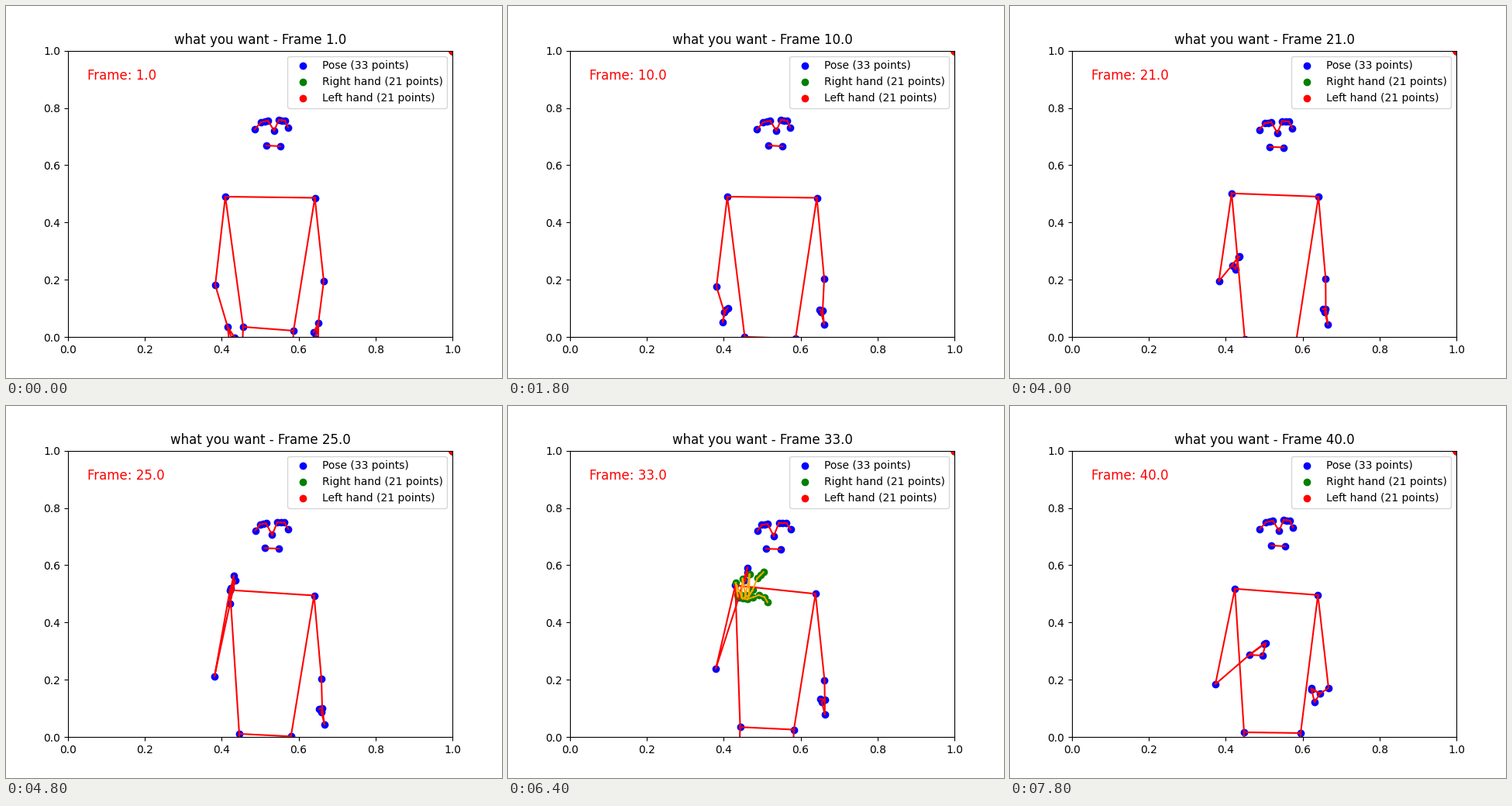
These frames come from a looping animation (640x480 px, 8 s). A matplotlib script:

```python
import numpy as np
import matplotlib.pyplot as plt
from matplotlib.animation import FuncAnimation

FRAMES = 40
HAND_SEEN = range(26, 33)

# Key moments in stage pixels: frame, elbow, wrist, index finger from the wrist
RIGHT_ARM = [
    (0, 270, 360, 286, 414, 8, 22),
    (9, 269, 362, 279, 395, 2, -3),
    (16, 270, 361, 284, 414, 12, 14),
    (24, 269, 349, 289, 255, 5, -36),
    (28, 271, 325, 296, 229, 13, -26),
    (35, 266, 349, 299, 261, 10, -48),
    (39, 265, 359, 309, 321, 21, -15),
]
LEFT_ARM = [
    (0, 410, 355, 403, 409, -4, 20),
    (9, 408, 352, 406, 393, -2, 2),
    (24, 407, 352, 408, 390, -1, 5),
    (35, 409, 355, 409, 375, -5, 2),
    (39, 411, 364, 400, 371, -11, -5),
]
# Frame, right hip, left hip
HIPS = [
    (0, 306, 414, 371, 419),
    (16, 305, 437, 371, 437),
    (28, 299, 416, 366, 421),
    (35, 300, 413, 371, 415),
    (39, 302, 421, 375, 422),
]
LEAN = [(16, 0), (24, 0.5), (28, 1), (39, 0.6)]
NOD = [(16, 0), (28, 1), (35, 0.7), (39, 0)]


def at(keys, i):
    """Keyed values at frame i, as one scalar or as rows of (x, y)."""
    time, *cols = np.array(keys, float).T
    vals = [np.interp(i, time, c) for c in cols]
    return vals[0] if len(vals) == 1 else np.reshape(vals, (-1, 2))


def head(i):
    """Ear, eye, eye, ear, mouth ends and nose; the middle moves most in a nod."""
    pts = np.vstack([(321, 159), np.linspace((329, 150), (338, 148), 3),
                     np.linspace((352, 147), (360, 148), 3), (364, 157),
                     (336, 180), (354, 181), (346, 161)])
    nod = at(NOD, i)
    depth = 1 - ((pts[:, 0] - 343) / 22) ** 2
    pts += nod * np.column_stack([-5 * depth, 2.5 + 2.8 * depth])
    pts[-1, 1] += 3 * nod
    pts[:, 0] += 0.03 * i
    return pts


def side(shoulder, arm, hip, out):
    """Shoulder to knee on one side; out is -1 or 1, away from the body."""
    elbow, wrist, index = arm
    pinky = index + (4 * out, 16)
    thumb = 0.75 * index + (-3 * out, -3)
    knee = hip + (-6, 150)
    return [shoulder, elbow, wrist, wrist + pinky, wrist + index, wrist + thumb, hip, knee]


def pose(i):
    lean = at(LEAN, i)
    hip_r, hip_l = at(HIPS, i)
    right = side(np.array([283, 246]) + lean * np.array([12, -17]), at(RIGHT_ARM, i), hip_r, -1)
    left = side(np.array([398.5, 247.5]) + lean * np.array([-2, -6]), at(LEFT_ARM, i), hip_l, 1)
    return to_data(np.vstack([head(i), right, left]))


def hand(i):
    if i not in HAND_SEEN:
        return np.ones((21, 2))
    arc = np.radians(np.linspace(229, 350, 4))
    thumb = np.column_stack([26 + 11.3 * np.cos(arc), 8 + 11.3 * np.sin(arc)])
    index = np.vstack([(18, -10), np.linspace((24, -25), (32, -33), 3)])
    pts = [(11, 2), *thumb, *index]
    # the other three fingers curl back to the palm
    for k in range(3):
        base = np.array([13 - 4 * k, -3 + 2 * k])
        top = np.array([14 - 9 * k, -30 + 5.5 * k])
        tip = np.array([8 - 4.5 * k, 1 - k])
        pts += [base, top, top + 0.85 * (tip - top), tip]
    return to_data(np.array(pts) + at(RIGHT_ARM, i)[1])


def to_data(px):
    return np.column_stack([(px[:, 0] - 80) / 496, (427.2 - px[:, 1]) / 369.6])


def chain(*ids):
    return list(zip(ids, ids[1:]))


def side_edges(base):
    sh, el, wr, pi, ix, th, hip, knee = range(base, base + 8)
    return chain(sh, el, wr, pi, ix, wr, th) + chain(sh, hip, knee)


# 0-7 ears and eyes, 8-9 mouth, 10 nose, 11-18 right side, 19-26 left side
POSE_EDGES = (chain(0, 1, 2, 3, 10, 4, 5, 6, 7) + [(8, 9), (11, 19), (17, 25)]
              + side_edges(11) + side_edges(19))
HAND_EDGES = chain(0, 5, 9, 13, 17, 0)
for root in (1, 5, 9, 13, 17):
    HAND_EDGES += chain(*range(root, root + 4))
HAND_EDGES += [(0, 1)]


def segments(pts, edges):
    gap = (np.nan, np.nan)
    return np.array([p for a, b in edges for p in (pts[a], pts[b], gap)]).T


fig, ax = plt.subplots(figsize=(6.4, 4.8), dpi=100)
ax.set_xlim(0, 1)
ax.set_ylim(0, 1)
corner = np.ones((21, 2))
pose_dots = ax.scatter(*pose(0).T, c="blue", label="Pose (33 points)")
hand_dots = ax.scatter(*corner.T, c="green", label="Right hand (21 points)")
ax.scatter(*corner.T, c="red", label="Left hand (21 points)")
pose_line, = ax.plot([], [], color="red")
hand_line, = ax.plot([], [], color="orange")
counter = ax.text(0.05, 0.9, "", fontsize=12, color="red")
ax.legend(loc="upper right")


def update(i):
    body, fingers = pose(i), hand(i)
    pose_dots.set_offsets(body)
    hand_dots.set_offsets(fingers)
    pose_line.set_data(*segments(body, POSE_EDGES))
    hand_line.set_data(*segments(fingers, HAND_EDGES))
    hand_line.set_visible(i in HAND_SEEN)
    ax.set_title(f"what you want - Frame {i + 1:.1f}")
    counter.set_text(f"Frame: {i + 1:.1f}")
    return pose_dots, hand_dots, pose_line, hand_line, counter


anim = FuncAnimation(fig, update, frames=FRAMES, interval=200, repeat=True, repeat_delay=0)
plt.show()
```
